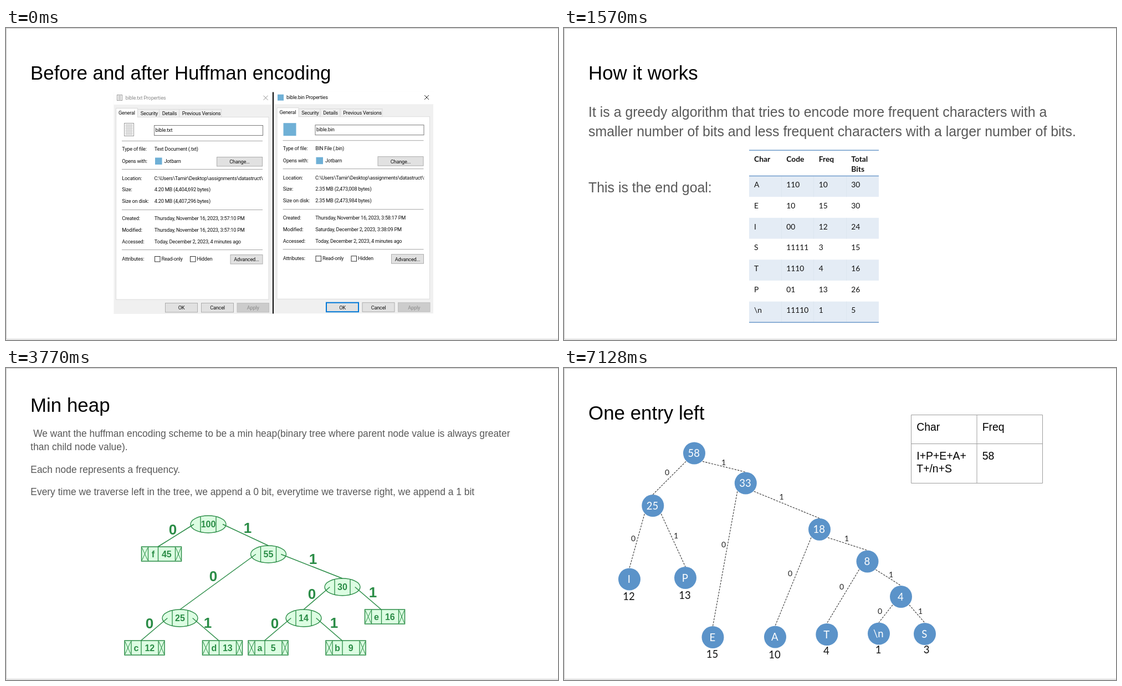
Write an HTML page that moves like this. It is 996 by 562 pixels and loops after 8 s.

```html
<!DOCTYPE html>
<html lang="en">
<head>
<meta charset="utf-8">
<title>Huffman slides</title>
<style>
html, body { margin: 0; width: 100%; height: 100%; overflow: hidden; background: #fff; }
svg { display: block; width: 996px; height: 562px; }
text { white-space: pre; }
.scene, #cursor { opacity: 0; animation: 8s step-end infinite; }
#sizes { animation-name: sizes; }
#codes { animation-name: codes; }
#heap { animation-name: heap; }
#last { animation-name: last; }
#cursor { animation-name: cursor; }
@keyframes sizes { 0% { opacity: 1 } 19.625%, 100% { opacity: 0 } }
@keyframes codes { 0% { opacity: 0 } 19.625% { opacity: 1 } 47.125%, 100% { opacity: 0 } }
@keyframes heap { 0% { opacity: 0 } 47.125% { opacity: 1 } 72.75%, 100% { opacity: 0 } }
@keyframes last { 0% { opacity: 0 } 72.75%, 100% { opacity: 1 } }
@keyframes cursor { 0% { opacity: 0 } 4.75% { opacity: 1 } 5.625%, 100% { opacity: 0 } }
.title, .body, .grid { font-family: "Liberation Sans", Arial, sans-serif; }
.title { font-size: 34.9px; }
.body { font-size: 24.9px; fill: #595959; }
.small { font-size: 17.43px; }
.grid { font-size: 19.4px; }
.ui { font: 9.2px Roboto, sans-serif; letter-spacing: -.22px; }
.mid { text-anchor: middle; }
.code { font: 13.8px Lato, sans-serif; fill: #111; }
.bold { font-weight: 700; }
.green { font: 700 16px "Liberation Sans", Arial, sans-serif; fill: #2a8c46; text-anchor: middle; }
.bit { font-size: 26px; }
.node { font: 18.5px Lato, sans-serif; text-anchor: middle; }
.edge { font: 14px Lato, sans-serif; text-anchor: middle; fill: #222; }
</style>
</head>
<body>
<svg viewBox="0 0 996 562">
  <defs><clipPath id="field"><rect x="262" y="262" width="202" height="18"/></clipPath></defs>
  <rect width="996" height="562" fill="#fff"/>
  <g class="scene" id="sizes"></g>
  <g class="scene" id="codes"></g>
  <g class="scene" id="heap"></g>
  <g class="scene" id="last"></g>
  <path d="M0 .5H996M.5 0V561M0 560.5H996" stroke="#c4c4c4" fill="none"/>
  <path id="cursor" d="M122 519.5V533.3L125.2 530.3L127.6 535.6L129.8 534.6L127.5 529.6H131.6Z" fill="#fff" stroke="#111"/>
</svg>
<script>
const put = (id, parts) => { document.getElementById(id).innerHTML = parts.join(''); };
const esc = s => String(s).replace(/&/g, '&amp;').replace(/</g, '&lt;');
const text = (s, x, y, cls, extra = '') => `<text x="${x}" y="${y}" class="${cls}" ${extra}>${esc(s)}</text>`;
const rect = (x, y, w, h, fill, stroke = 'none', sw = 1) =>
  `<rect x="${x}" y="${y}" width="${w}" height="${h}" fill="${fill}" stroke="${stroke}" stroke-width="${sw}"/>`;
const path = (d, stroke, extra = '') => `<path d="${d}" fill="none" stroke="${stroke}" ${extra}/>`;

// Properties dialog
const ui = (s, x, cy, fill = '#111', cls = '') => text(s, x, cy + 3.3, 'ui ' + cls, `fill="${fill}"`);

function button(label, x, y, w, off, focus) {
  const edge = focus ? '#0078d7' : off ? '#bfbfbf' : '#adadad';
  return rect(x, y, w, 16.5, off ? '#ccc' : '#e1e1e1', edge, focus ? 2 : 1) +
    ui(label, x + w / 2, y + 8.6, off ? '#8a8a8a' : '#111', 'mid');
}

function page(x, y, w, h, rows) {
  let d = '';
  for (let i = 1; i <= rows; i++) d += `M${x + 2} ${y + i * h / (rows + 1)}h${w - 4}`;
  return rect(x, y, w, h, '#fff', '#9a9a9a') + path(d, '#a8a8a8');
}

function dialog(f) {
  const blue = '#6fb0d6', on = f.active;
  const tabs = [['Security', 237, 39], ['Details', 276, 36], ['Previous Versions', 312, 76]];
  const rows = [
    ['Type of file:', f.type, 218], ['Opens with:', '', 239.5], ['Location:', '', 270.5],
    ['Size:', f.size, 291], ['Size on disk:', f.disk, 311.5], ['Created:', f.created, 342.7],
    ['Modified:', f.modified, 363.5], ['Accessed:', 'Today, December 2, 2023, 4 minutes ago', 384.3],
    ['Attributes:', '', 416]
  ];
  return [
    rect(194.5, 115, 286, 400, '#f0f0f0'),
    rect(194.5, 115, 286, 23, '#fff'),
    on ? rect(199.5, 120.5, 11, 11, blue) : page(200.5, 120.5, 9, 10, 4),
    ui(f.name + ' Properties', 215.5, 126, on ? '#111' : '#8c8c8c'),
    path('M464.5 121.8l8 8m0-8l-8 8', on ? '#222' : '#8c8c8c'),
    rect(198.5, 160.5, 275.5, 328.5, '#fff', '#dcdcdc'),
    ...tabs.map(([s, x, w]) => rect(x + .5, 146.5, w, 14, '#f0f0f0', '#d9d9d9') + ui(s, x + 5.8, 153.3)),
    path('M198.5 161V144.5H237.5V161', '#d9d9d9', 'style="fill:#fff"'),
    ui('General', 203, 152.3),
    on ? rect(210, 172, 23, 23, blue) : page(213.5, 171.5, 17, 23, 8),
    rect(267.5, 175.5, 196, 18, '#fff', '#7a7a7a'),
    ui(f.name, 269.5, 184),
    path('M209 203.5H463M209 254.5H463M209 327.5H463M209 399.5H463', '#a6a6a6'),
    ...rows.map(([k, v, y]) => ui(k, 209.3, y) + ui(v, 267.7, y)),
    rect(269, 233.5, 12.5, 12.5, blue),
    ui('Jotbarn', 285.5, 239.5),
    `<g clip-path="url(#field)">${ui('C:\\Users\\Tamir\\Desktop\\assignments\\datastruct\\final', 267.5, 270.5)}</g>`,
    button('Change...', 380.5, 232.5, 82),
    rect(268.5, 411.5, 9.5, 9.5, '#fff', '#333'), ui('Read-only', 280.5, 416),
    rect(332.5, 411.5, 9.5, 9.5, '#fff', '#333'), ui('Hidden', 344.5, 416),
    button('Advanced...', 405, 408.5, 58),
    button('OK', 287.5, 495.5, 58, false, on),
    button('Cancel', 352.5, 495.5, 58),
    button('Apply', 417, 495.5, 57.5, true)
  ].join('');
}

put('sizes', [
  text('Before and after Huffman encoding', 44, 92.5, 'title'),
  dialog({
    name: 'bible.txt', type: 'Text Document (.txt)',
    size: '4.20 MB (4,404,692 bytes)', disk: '4.20 MB (4,407,296 bytes)',
    created: 'Thursday, November 16, 2023, 3:57:10 PM', modified: 'Thursday, November 16, 2023, 3:57:10 PM'
  }),
  '<g transform="translate(290.5 -.8)">' + dialog({
    name: 'bible.bin', type: 'BIN File (.bin)', active: true,
    size: '2.35 MB (2,473,008 bytes)', disk: '2.35 MB (2,473,984 bytes)',
    created: 'Thursday, November 16, 2023, 3:58:17 PM', modified: 'Saturday, December 2, 2023, 3:38:09 PM'
  }) + '</g>',
  rect(480.8, 115.5, 2.4, 399, '#1c1c1c')
]);

// Code table
const cols = [343, 401.3, 459.8, 518.3];
const codes = ['A 110 10 30', 'E 10 15 30', 'I 00 12 24', 'S 11111 3 15', 'T 1110 4 16', 'P 01 13 26', '\\n 11110 1 5'];
const step = 37.7;

put('codes', [
  text('How it works', 44, 92.5, 'title'),
  text('It is a greedy algorithm that tries to encode more frequent characters with a', 44, 160.4, 'body'),
  text('smaller number of bits and less frequent characters with a larger number of bits.', 44, 194.6, 'body'),
  text('This is the end goal:', 44, 296.2, 'body'),
  ...['Char', 'Code', 'Freq', 'Total'].map((s, i) => text(s, cols[i], 241, 'code bold')),
  text('Bits', cols[3], 258.7, 'code bold'),
  ...codes.map((row, i) => {
    const y = 266.5 + i * step;
    return (i % 2 ? '' : rect(334, y, 234, step, '#e4ecf5') +
      path(`M392.5 ${y}v${step}M450.5 ${y}v${step}M509.5 ${y}v${step}`, '#dde6f0')) +
      row.split(' ').map((s, c) => text(s, cols[c], y + 20.6, 'code')).join('');
  }),
  path('M334 220.3H568M334 266.5H568M334 530.3H568', '#6f9bcb', 'stroke-width="1.4"')
]);

// Heap diagram
const green = '#2a8c46', mint = '#dcfde2';
const bit = (s, x, y) => text(s, x, y + 9.2, 'green bit');
const oval = (v, x, y) =>
  `<ellipse cx="${x}" cy="${y}" rx="32" ry="15.5" fill="${mint}" stroke="${green}" stroke-width="1.4"/>` +
  path(`M${x - 14} ${y - 14}v28M${x + 14} ${y - 14}v28`, green, 'stroke-width="1.3"') +
  text(v, x, y + 5.3, 'green');
const leaf = (c, v, x, y) =>
  rect(x, y, 72, 26, mint, green, 1.5) +
  path(`M${x + 12} ${y}v26M${x + 30} ${y}v26M${x + 61} ${y}v26`, green, 'stroke-width="1.3"') +
  path(`M${x + 1} ${y + 2}l10 22m0-22l-10 22M${x + 62} ${y + 2}l9 22m0-22l-9 22`, green) +
  text(c, x + 21, y + 18.6, 'green') + text(v, x + 45.3, y + 18.6, 'green');

const ovals = [[100, 365, 281.5], [55, 473.5, 335.5], [30, 607, 394.5], [25, 314, 450.5], [14, 537, 450.5]];
const leaves = [['f', 45, 244.5, 322], ['e', 16, 647.5, 435], ['c', 12, 214, 491],
  ['d', 13, 354.5, 491], ['a', 5, 437, 491], ['b', 9, 577, 491]];
const tip = v => {
  const o = ovals.find(n => n[0] === v);
  if (o) return [o[1], o[2] - 15.5];
  const l = leaves.find(n => n[0] === v);
  return [l[2] + 29.5, l[3]];
};
const links = [[100, 'f', 55], [55, 25, 30], [30, 14, 'e'], [25, 'c', 'd'], [14, 'a', 'b']];
const bits = [[301, 291], [436, 288], [374, 375], [554, 344], [552, 407], [662, 404], [259, 460], [364, 459], [485, 460], [592, 459]];

put('heap', [
  text('Min heap', 44, 79, 'title'),
  text(' We want the huffman encoding scheme to be a min heap(binary tree where parent node value is always greater', 44.3, 124.2, 'body small'),
  text('than child node value).', 44.3, 148.2, 'body small'),
  text('Each node represents a frequency.', 44.3, 189, 'body small'),
  text('Every time we traverse left in the tree, we append a 0 bit, everytime we traverse right, we append a 1 bit', 44.3, 229.3, 'body small'),
  ...ovals.map(o => oval(...o)),
  ...leaves.map(l => leaf(...l)),
  ...links.map(([p, l, r]) => {
    const [, x, y] = ovals.find(n => n[0] === p), s = p === 100 ? 26 : 22.7;
    return path(`M${x - s} ${y}L${tip(l)}M${x + s} ${y}L${tip(r)}`, green, 'stroke-width="1.5"');
  }),
  ...bits.map(([x, y], i) => bit(i % 2, x, y))
]);

// Finished tree: label, centre, parent, bit, bit position, count and its position
const nodes = [
  { s: 58, x: 235, y: 153.5 },
  { s: 25, x: 160.3, y: 248, up: 0, bit: 0, at: [186, 188] },
  { s: 33, x: 327.8, y: 207.5, up: 0, bit: 1, at: [288, 170] },
  { s: 'I', x: 118, y: 380.5, up: 1, bit: 0, at: [125, 307], n: 12, ny: 411.5 },
  { s: 'P', x: 219, y: 378, up: 1, bit: 1, at: [202, 301.5], n: 13, ny: 409.5 },
  { s: 'E', x: 268.5, y: 485, up: 2, bit: 0, at: [288, 317.5], n: 15, ny: 515.5 },
  { s: 18, x: 461, y: 290.7, up: 2, bit: 1, at: [392.5, 232] },
  { s: 'A', x: 381, y: 484.5, up: 6, bit: 0, at: [408, 370], n: 10, ny: 516 },
  { s: 8, x: 547.5, y: 348.5, up: 6, bit: 1, at: [510, 307] },
  { s: 'T', x: 474.3, y: 480, up: 8, bit: 0, at: [501, 393.5], n: 4, ny: 509 },
  { s: 4, x: 608, y: 412, up: 8, bit: 1, at: [590, 372] },
  { s: '\\n', x: 568, y: 478.5, up: 10, bit: 0, at: [570, 438], n: 1, ny: 507.5 },
  { s: 'S', x: 651, y: 479, up: 10, bit: 1, at: [643, 438], n: 3, nx: 654, ny: 507.5 }
];

put('last', [
  text('One entry left', 44, 92.5, 'title'),
  path('M626.5 84.5H863.5V207.5H626.5ZM626.5 136.5H863.5M745 84.5V207.5', '#9e9e9e'),
  text('Char', 636.3, 113, 'grid'), text('Freq', 754.7, 113, 'grid'),
  text('I+P+E+A+', 636.3, 165, 'grid'), text('T+/n+S', 636.3, 188.3, 'grid'),
  text('58', 754.7, 165, 'grid'),
  ...nodes.map(({ s, x, y, up, bit, at, n, nx, ny }) => {
    let out = '';
    if (at) {
      const p = nodes[up];
      out += path(`M${p.x + (bit ? 15 : -15)} ${p.y + 14.8}L${x} ${y - 20}`, '#333', 'stroke-width="1.1" stroke-dasharray="3.4 2"');
      out += text(bit, at[0], at[1] + 5, 'edge');
    }
    out += `<circle cx="${x}" cy="${y}" r="20" fill="#5b93c9"/>` + text(s, x - .7, y + 6.5, 'node', 'fill="#fff"');
    return n ? out + text(n, nx || x - .9, ny + 6.6, 'node', 'fill="#111"') : out;
  })
]);
</script>
</body>
</html>
```
